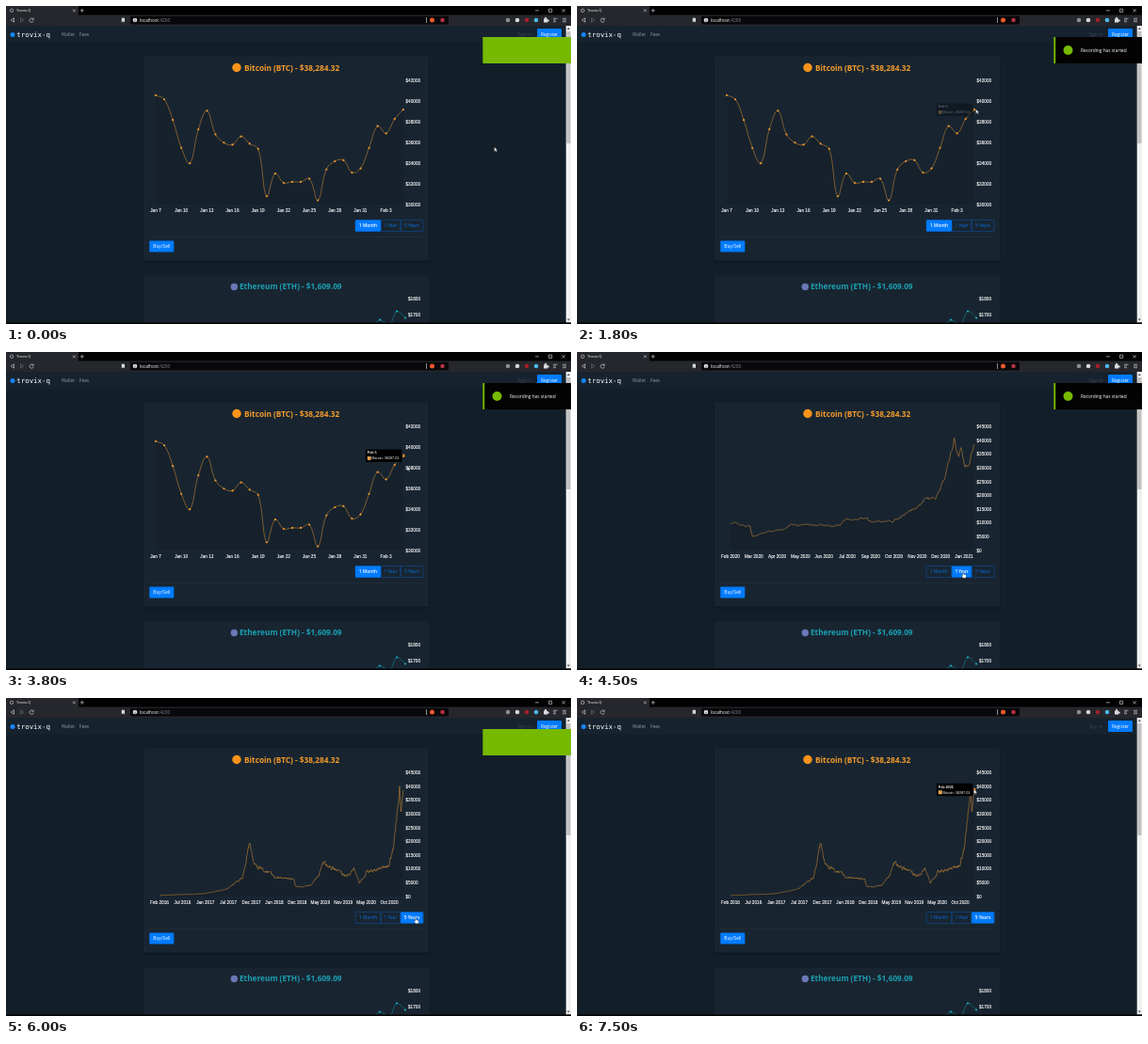
An HTML page for the animation above (8 s loop, 600x338 px).

```html
<!DOCTYPE html>
<html lang="en">
<head>
<meta charset="utf-8">
<title>Trovix-Q</title>
<style>
  html, body { margin: 0; width: 100%; height: 100%; overflow: hidden; background: #121f29; }
  svg { display: block; width: 100vw; height: 100vh; }
  text { font: 4.8px "Open Sans", sans-serif; fill: #fff; }
  .mid { text-anchor: middle; }
  .title { font-size: 8.25px; font-weight: 700; }
  .axis text { font: 4.7px "Liberation Sans", Arial, sans-serif; stroke: #fff; stroke-width: .12; }
  .tip text { font: 3.75px "Liberation Sans", Arial, sans-serif; }
  .tip .head { font-weight: bold; }
  .icon { fill: none; stroke: #c4c6ca; stroke-width: .7; }
  .option rect { fill: none; stroke: #0763c9; stroke-width: .4; }
  .option text { fill: #0a70e4; }
  .option.on rect { fill: #007bff; stroke: #007bff; }
  .option.on text { fill: #fff; font-weight: 600; }
  .option.focus rect { stroke: #0a59ae; stroke-width: 1; }
</style>
</head>
<body>
<svg viewBox="0 0 600 338" preserveAspectRatio="none">
  <rect width="600" height="338" fill="#121f29"/>

  <!-- browser window -->
  <rect width="600" height="10" fill="#020203"/>
  <rect width="77" height="10" fill="#25272c"/>
  <rect y="9.5" width="600" height="11.5" fill="#25272c"/>
  <rect x="132" y="10.8" width="338" height="8.6" rx="1" fill="#08080a"/>
  <circle class="icon" cx="6" cy="4.8" r="1.7"/>
  <text x="11" y="6.3" style="font-size:4px">Trovix-Q</text>
  <path class="icon" d="M71 3.4l2.8 2.8m0-2.8l-2.8 2.8M78.8 4.8h4m-2-2v4M562 4.8h4M576.5 3.2h3.2v3.2h-3.2zM590.5 3.2l3.2 3.2m0-3.2l-3.2 3.2M8.5 12.8l-3.3 2.2 3.3 2.2zM446.5 12v6"/>
  <path class="icon" style="stroke:#666a70" d="M15.5 12.8l3.3 2.2-3.3 2.2z"/>
  <path class="icon" d="M28.7 13.7a2.1 2.1 0 1 0 .5 2M29.2 12.6v1.7h-1.7"/>
  <path fill="#d8dadd" d="M122.8 12.8h3.2v4.6l-1.6-1.2-1.6 1.2z"/>
  <circle cx="137" cy="15" r="2.3" fill="#e4e5e7"/>
  <path stroke="#111" stroke-width=".7" d="M137 13.5v.6m0 .6v2"/>
  <text x="141.8" y="16.7">localhost<tspan fill="#888b90">:4200</tspan></text>
  <circle cx="452.5" cy="15" r="2.5" fill="#f0592b"/>
  <circle cx="463.5" cy="15" r="2.3" fill="#b3303f"/>
  <g id="extensions"></g>
  <path fill="#d8dadd" d="M571 13.5h1.3a1 1 0 1 1 1.5 0h1.4v1.3a1 1 0 1 1 0 1.5v1.3H571z"/>
  <path class="icon" d="M581 13.3h4.5m-4.5 1.7h3m-3 1.7h3M591 13.3h4m-4 1.7h4m-4 1.7h4"/>

  <!-- navigation -->
  <rect y="21" width="595" height="17.5" fill="#16232e"/>
  <circle cx="7" cy="30.5" r="2.5" fill="#1686ff"/>
  <text x="11.3" y="32.6" style="font:7.4px 'DejaVu Sans Mono',monospace" fill="#dce3e8">trovix-q</text>
  <text x="59" y="31.8" style="fill:#929aa1">Wallet</text>
  <text x="78" y="31.8" style="fill:#929aa1">Fees</text>
  <text x="543.5" y="31.8" style="fill:#3c4853">Sign in</text>
  <rect x="564" y="24" width="26" height="12" rx="1" fill="#007bff"/>
  <text class="mid" x="577" y="31.8">Register</text>
  <rect x="594.7" y="21" width="5.3" height="315.5" fill="#f1f1f1"/>
  <rect x="595.2" y="27" width="4.3" height="119" fill="#c1c1c1"/>
  <path fill="#555" d="M595.7 25l1.6-2 1.6 2zM595.7 332.5l1.6 2 1.6-2z"/>

  <!-- cards -->
  <rect x="145" y="54" width="305" height="219" rx="2" fill="#0f1a23"/>
  <rect x="146" y="53.5" width="303" height="217" rx="1.5" fill="#182531"/>
  <rect x="146" y="286.5" width="303" height="52" rx="1.5" fill="#182531"/>
  <circle cx="245" cy="65.5" r="4.7" fill="#f7931a"/>
  <text class="title" x="253" y="69" style="fill:#f39b2c">Bitcoin (BTC) - $38,284.32</text>
  <g id="labels" class="axis"></g>
  <path id="area" fill="#000" opacity=".1"/>
  <path id="line" fill="none" stroke="#c58431" stroke-width=".6" stroke-linejoin="round"/>
  <g id="dots" fill="#f39b2c"></g>
  <path stroke="#25333f" stroke-width=".5" d="M152 245.5H443"/>
  <rect x="152.3" y="249.5" width="26" height="12" rx="1" fill="#007bff"/>
  <text class="mid" x="165.3" y="257.4">Buy/Sell</text>
  <g id="options"></g>

  <circle cx="242.3" cy="298.5" r="3.7" fill="#6b78b8"/>
  <text class="title" x="248" y="301.3" style="fill:#1b9fb2">Ethereum (ETH) - $1,609.09</text>
  <g class="axis"><text x="427" y="313">$1800</text><text x="427" y="329.7">$1700</text></g>
  <path fill="none" stroke="#178796" stroke-width=".6" d="M391 339Q395 333.5 397 333.5C401 334 404 339 407 339S412 325 415 324.5 421 329 424 331.5"/>
  <g fill="#1bb0c4"><circle cx="397" cy="333.5" r="1.1"/><circle cx="415" cy="324.5" r="1.1"/><circle cx="424" cy="331.5" r="1.1"/></g>
  <rect y="336.5" width="600" height="1.5" fill="#030405"/>

  <!-- tooltip, anchored at the point it describes -->
  <g id="tip" class="tip">
    <circle r="1.7" fill="#f39b2c"/>
    <path d="M-39-6.7h36.5q1 0 1 1v3.9l1.5 1.8-1.5 1.8v3.9q0 1-1 1h-36.5q-1 0-1-1v-11.4q0-1 1-1z"/>
    <text id="tipHead" class="head" x="-38" y="-1.8"></text>
    <rect x="-37.8" y="1" width="3.5" height="3.5" fill="#f39b2c" stroke="#fff" stroke-width=".3"/>
    <text x="-33.4" y="4.1">Bitcoin: 38287.01</text>
  </g>

  <!-- notification -->
  <rect id="green" x="506.3" y="33" width="94" height="28" fill="#76b900"/>
  <g id="notice">
    <rect x="508.2" y="33" width="92" height="28" fill="#030303"/>
    <circle cx="521.5" cy="47" r="5" fill="#76b900"/>
    <text x="535" y="48.9">Recording has started</text>
  </g>

  <g id="cursor" stroke="#111" stroke-width=".35" fill="#fff">
    <path id="arrow" d="M0 0v5l1.2-1 .8 1.7.8-.4-.8-1.6h1.6z"/>
    <path id="hand" d="M-.5 .3q.6-.7 1.1 0v2l2.3.6q.7.3.5 1.1l-.5 2.3h-2.8l-2-2.5q.1-.8 1.4 0z"/>
  </g>
</svg>

<script>
const LOOP = 8000, TOP = 79.5, BASE = 211, RIGHT = 421.8;
const TO_YEAR = 4100, TO_FIVE = 5700;
const $ = id => document.getElementById(id);
const span = (t, from, to) => Math.max(0, Math.min(1, (t - from) / (to - from)));
const easeOut = p => 1 - (1 - p) ** 4;
const smooth = p => p * p * (3 - 2 * p);
const mix = (a, b, p) => a + (b - a) * p;

// Prices between [percent of time, price] keys, with seeded market noise.
function market(keys, count, rough, seed) {
  const random = () => (seed = (seed * 16807) % 2147483647) / 2147483647 - .5;
  let noise = 0;
  return Array.from({ length: count }, (_, i) => {
    const at = i / (count - 1) * 100;
    const k = Math.max(1, keys.findIndex(key => key[0] >= at));
    const [a, from] = keys[k - 1], [b, to] = keys[k];
    noise = noise * .75 + random() * rough;
    return mix(from, to, span(at, a, b)) * (1 + noise * span(at, 100, 99));
  });
}

// All prices are in thousands of dollars.
const monthPrices = [40.6, 40.2, 38.2, 35.5, 34, 37.3, 39.1, 36.8, 36, 35.8, 36.6, 35.9, 35.4, 30.8, 33,
  32.1, 32.2, 32.2, 32.5, 30.4, 33.4, 34.2, 34.3, 33.1, 33.5, 35.5, 37.6, 36.9, 38.3, 39.2];
const yearPrices = market([[0, 9.9], [8, 8.8], [9, 5], [16, 6.9], [22, 7.8], [25, 9.5], [45, 9.2], [47, 11],
  [56, 11.7], [58, 10.2], [67, 10.9], [77, 15.8], [80, 19], [84, 18.8], [88, 26], [91.8, 41], [93.5, 34.5],
  [94.5, 37], [96, 31], [97.5, 31], [100, 38.6]], 366, .05, 41);
const fivePrices = market([[0, .4], [18, 1], [27, 2.5], [34, 6.5], [37, 19.5], [39, 11], [45, 8.8], [47, 7],
  [55, 6.4], [56, 3.5], [62, 4], [65.5, 8], [67, 12], [72, 10], [76.5, 7.3], [80, 10], [82, 5], [85, 9],
  [94, 11], [96, 18.5], [98.5, 40.5], [99.2, 31], [100, 38.6]], 900, .09, 77);

const months = 'Jan Feb Mar Apr May Jun Jul Aug Sep Oct Nov Dec'.split(' ');
const monthName = m => `${months[m % 12]} ${2016 + Math.floor(m / 12)}`;
const monthDays = Array.from({ length: 10 }, (_, i) => i < 9 ? `Jan ${7 + 3 * i}` : 'Feb 3');
const yearMonths = [1, 2, 3, 4, 5, 6, 8, 9, 10, 11, 12].map(m => monthName(48 + m));
const fiveMonths = [1, 6, 12, 18, 23, 29, 35, 40, 46, 52, 57].map(monthName);

const modes = [
  { prices: monthPrices, names: monthDays, left: 159, step: 27.17, min: 30, max: 42, tick: 2 },
  { prices: yearPrices, names: yearMonths, left: 163, step: 24.8, min: 0, max: 45, tick: 5 },
  { prices: fivePrices, names: fiveMonths, left: 163, step: 24.4, min: 0, max: 45, tick: 5 }
];
for (const m of modes) {
  m.y = price => mix(BASE, TOP, (price - m.min) / (m.max - m.min));
  m.points = m.prices.map((price, i) => [mix(m.left, RIGHT, i / (m.prices.length - 1)), m.y(price)]);
}

const straight = pts => 'M' + pts.map(p => p.map(v => v.toFixed(2)).join(' ')).join('L');

function spline(pts) {
  const handle = (i, side) => {
    const p = pts[i], a = pts[i - 1] || p, b = pts[i + 1] || p;
    const before = Math.hypot(p[0] - a[0], p[1] - a[1]), after = Math.hypot(b[0] - p[0], b[1] - p[1]);
    const f = .4 * (side > 0 ? after : before) / (before + after) * side;
    return [p[0] + f * (b[0] - a[0]), p[1] + f * (b[1] - a[1])];
  };
  return pts.reduce((d, p, i) => i ? `${d}C${handle(i - 1, 1)} ${handle(i, -1)} ${p}` : `M${p}`, '');
}

// Existing points travel to their new place, added ones rise from the base.
const morph = (from, to, p) => to.map(([x, y], i) => {
  const [fx, fy] = from[i] || [x, BASE];
  return [mix(fx, x, p), mix(fy, y, p)];
});

$('extensions').innerHTML = ['#8b8d91', '#d5d6d8', '#a3202b', '#4bb8e8']
  .map((c, i) => `<circle cx="${533 + i * 10}" cy="15" r="2.3" fill="${c}"/>`).join('');
$('dots').innerHTML = modes[0].points.map(([x, y]) => `<circle cx="${x}" cy="${y}" r="1.1"/>`).join('');
$('options').innerHTML = [['1 Month', 371, 27], ['1 Year', 398, 21], ['5 Years', 419, 24]].map(([name, x, w]) =>
  `<g class="option"><rect x="${x}" y="227.5" width="${w}" height="12" rx=".8"/>` +
  `<text class="mid" x="${x + w / 2}" y="235.4">${name}</text></g>`).join('');

let shown = -1;
function showMode(index) {
  if (index === shown) return;
  shown = index;
  const m = modes[index];
  let html = m.names.map((n, i) => `<text class="mid" x="${m.left + i * m.step}" y="218.7">${n}</text>`).join('');
  for (let v = m.min; v <= m.max; v += m.tick) {
    html += `<text x="424.5" y="${m.y(v) + 1.7}">$${v * 1000}</text>`;
  }
  $('labels').innerHTML = html;
  [...$('options').children].forEach((el, i) => {
    el.classList.toggle('on', i === index);
    el.classList.toggle('focus', i === index && index > 0);
  });
  $('dots').style.display = index ? 'none' : '';
}

// Pointer moves: start, end, then where the tip comes to rest.
const moves = [[900, 1600, 423.5, 109.5], [1800, 2200, 426.5, 118], [3770, 4080, 410, 234],
  [5250, 5500, 418, 235], [5500, 5700, 435, 233.5], [6100, 6600, 427, 117], [6700, 7400, 421.5, 97]];
const pointer = t => moves.reduce(([x, y], [from, to, nx, ny]) => {
  const p = smooth(span(t, from, to));
  return [mix(x, nx, p), mix(y, ny, p)];
}, [518.5, 149.7]);

function draw(t) {
  const index = t < TO_YEAR ? 0 : t < TO_FIVE ? 1 : 2;
  const { points } = modes[index];
  showMode(index);
  const p = easeOut(index === 1 ? span(t, TO_YEAR, TO_YEAR + 500) : span(t, TO_FIVE, TO_FIVE + 300));
  const path = index ? straight(morph(modes[index - 1].points, points, p)) : spline(points);
  $('line').setAttribute('d', path);
  $('area').setAttribute('d', `${path}V${BASE}H${modes[index].left}z`);

  const late = index === 2;
  const alpha = late ? easeOut(span(t, 7050, 7450)) : easeOut(span(t, 1765, 2165)) * (1 - span(t, 3800, 4000));
  $('tip').setAttribute('transform', `translate(${RIGHT} ${late ? 97.5 : 110.2})`);
  $('tip').setAttribute('opacity', alpha);
  $('tipHead').textContent = late ? 'Feb 2021' : 'Feb 5';

  const noticeX = 92 * (1 - easeOut(span(t, 50, 600)) + span(t, 5550, 5950) ** 2);
  $('notice').setAttribute('transform', `translate(${noticeX})`);
  $('green').setAttribute('transform', `translate(${94 * smooth(span(t, 6050, 6500))})`);

  const [x, y] = pointer(t), overButton = y > 226;
  $('cursor').setAttribute('transform', `translate(${x} ${y})`);
  $('hand').style.display = overButton ? '' : 'none';
  $('arrow').style.display = overButton ? 'none' : '';
}

const start = performance.now();
(function frame() {
  draw((performance.now() - start) % LOOP);
  requestAnimationFrame(frame);
})();
</script>
</body>
</html>
```
